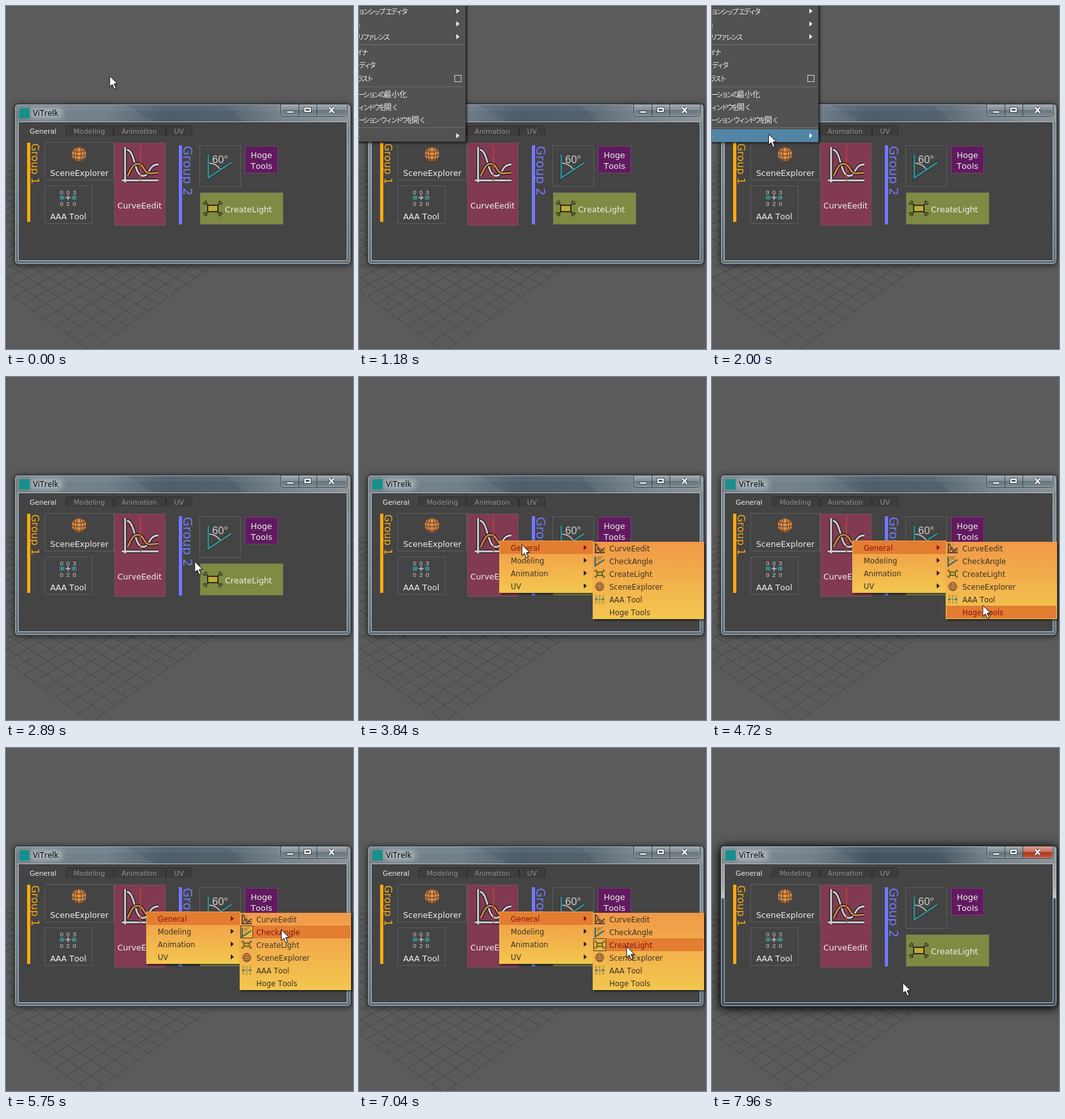
These frames come from a looping animation (542x537 px, 7.99 s). An HTML page with a canvas:

```html
<!DOCTYPE html>
<html lang="ja">
<head>
<meta charset="utf-8">
<title>Tool shelf</title>
<style>
html, body { margin: 0; width: 100%; height: 100%; overflow: hidden; background: #5b5b5b; }
canvas { display: block; width: 542px; height: 537px; }
</style>
</head>
<body>
<canvas id="stage" width="542" height="537"></canvas>
<script>
const ctx = document.getElementById('stage').getContext('2d');
const LOOP = 7990;
const UI = '"DejaVu Sans", sans-serif';
const JP = '"Noto Sans CJK JP", "Noto Sans CJK", sans-serif';
ctx.fontKerning = 'none';

// Pointer path: time, x, y
const path = [
  [0, 162, 110], [40, 162, 110], [235, 22, 7], [280, -20, -30],
  [1550, -20, 24], [1590, 4, 30], [2000, 88, 201], [2120, 132, 203],
  [2250, 195, 210], [2350, 260, 232], [2600, 356, 300], [2720, 360, 318],
  [3090, 219, 256], [3400, 219, 256], [3570, 240, 262], [3720, 240, 262],
  [3840, 254, 263], [4110, 398, 261], [4260, 398, 261], [4720, 423, 358],
  [4870, 425, 359], [5050, 425, 359], [5750, 430, 285], [5830, 430, 278],
  [6010, 428, 264], [6220, 428, 264], [6470, 424, 278], [6830, 424, 278],
  [7040, 418, 311], [7230, 420, 348], [7530, 420, 348], [7780, 298, 368],
  [LOOP, 298, 368]
];

function pointer(t) {
  const i = Math.max(1, path.findIndex(k => k[0] >= t));
  const [t0, x0, y0] = path[i - 1], [t1, x1, y1] = path[i];
  const u = (t - t0) / (t1 - t0);
  return [x0 + (x1 - x0) * u, y0 + (y1 - y0) * u];
}

function rect(x, y, w, h, fill, edge) {
  ctx.fillStyle = fill;
  ctx.fillRect(x, y, w, h);
  if (edge) {
    ctx.strokeStyle = edge;
    ctx.lineWidth = 1;
    ctx.strokeRect(x + .5, y + .5, w - 1, h - 1);
  }
}

function round(x, y, w, h, r) {
  ctx.beginPath();
  ctx.roundRect(x, y, w, h, r);
}

function text(s, x, y, size, color, font = UI, align = 'left') {
  ctx.font = size + 'px ' + font;
  ctx.textAlign = align;
  ctx.fillStyle = color;
  ctx.fillText(s, x, y);
}

// Japanese UI text: compact kana beside full-width kanji
function jpText(s, x, y, color, fromRight) {
  const runs = s.match(/[一-龠]+|[^一-龠]+/g).map(run => {
    const kanji = /[一-龠]/.test(run);
    const size = kanji ? 12 : 10.8;
    ctx.font = size + 'px ' + JP;
    ctx.letterSpacing = kanji ? '0px' : '-2.7px';
    return { run, size, gap: ctx.letterSpacing, width: ctx.measureText(run).width };
  });
  if (fromRight) x -= runs.reduce((sum, r) => sum + r.width, 0);
  for (const { run, size, gap, width } of runs) {
    ctx.letterSpacing = gap;
    text(run, x, y, size, color, JP);
    x += width;
  }
  ctx.letterSpacing = '0px';
}

function poly(pts, color, width, close) {
  ctx.beginPath();
  pts.forEach(([x, y]) => ctx.lineTo(x, y));
  if (close) ctx.closePath();
  if (width) {
    ctx.strokeStyle = color;
    ctx.lineWidth = width;
    ctx.stroke();
  } else {
    ctx.fillStyle = color;
    ctx.fill();
  }
}

function ramp(x0, y0, x1, y1, ...stops) {
  const g = ctx.createLinearGradient(x0, y0, x1, y1);
  stops.forEach(([p, c]) => g.addColorStop(p, c));
  return g;
}

function arrow(x, y, color) {
  poly([[x, y - 4], [x + 5, y], [x, y + 4]], color);
}

// Ground plane seen in perspective
function ground() {
  rect(0, 0, 542, 537, '#5b5b5b');
  const project = (x, z) => {
    const d = (x + z) * Math.SQRT1_2, s = (x - z) * Math.SQRT1_2;
    const k = 834 / (44.8 - .884 * d);
    return [133 + s * k, 318 + .468 * d * k];
  };
  for (let i = -12; i <= 12; i++) {
    poly([project(i, -12), project(i, 12)], '#464646', 1);
    poly([project(-12, i), project(12, i)], '#464646', 1);
  }
}

function frame(active) {
  ctx.save();
  ctx.shadowColor = active ? 'rgba(0,0,0,.85)' : 'rgba(0,0,0,.6)';
  ctx.shadowBlur = active ? 18 : 10;
  ctx.shadowOffsetY = active ? 2 : 1;
  round(13, 153, 526, 252, 6);
  ctx.fillStyle = '#24292d';
  ctx.fill();
  ctx.restore();

  ctx.save();
  round(14, 154, 524, 250, 5);
  ctx.clip();
  rect(14, 154, 524, 250, active
    ? ramp(0, 154, 0, 404, [0, '#8d959b'], [.25, '#a1a8ad'], [.32, '#c3c9cc'], [.33, '#46525e'], [1, '#45515d'])
    : ramp(0, 154, 0, 404, [0, '#7d868c'], [.4, '#7f8b93'], [1, '#64717b']));
  rect(14, 154, 524, 27, ramp(14, 0, 538, 0,
    [0, active ? '#838d94' : '#788289'], [.27, active ? '#74818a' : '#71808a'],
    [.45, active ? '#495968' : '#53636f'], [.66, active ? '#4c5c69' : '#5a6974'],
    [.8, '#79848b'], [1, '#8e9599']));
  poly([[185, 154], [345, 154], [372, 181], [232, 181]], 'rgba(35,53,68,.12)');
  rect(14, 154, 524, 10, 'rgba(255,255,255,.05)');
  ctx.restore();
  round(14.5, 154.5, 523, 249, 5);
  ctx.strokeStyle = active ? '#b4bdc3' : '#a9b2b8';
  ctx.lineWidth = 1;
  ctx.stroke();

  // Title and icon
  ctx.save();
  ctx.filter = 'blur(5px)';
  rect(39, 161, 48, 14, 'rgba(220,228,232,.6)');
  ctx.restore();
  rect(21, 160, 16, 16, '#178f8d');
  text('ViTrelk', 42, 172, 12.6, '#080808', '"Noto Sans", sans-serif');

  // Window buttons
  ctx.save();
  ctx.beginPath();
  ctx.rect(429, 154, 105, 20);
  ctx.clip();
  round(429.5, 149, 103, 23.5, 4);
  ctx.fillStyle = ramp(0, 154, 0, 173, [0, '#a5adb2'], [.48, '#808b92'], [.5, '#687680'], [1, '#7c8991']);
  ctx.fill();
  if (active) {
    round(486, 149, 46, 23, [0, 0, 4, 0]);
    ctx.fillStyle = ramp(0, 154, 0, 173, [0, '#d99c8f'], [.48, '#c66d5b'], [.5, '#ad3421'], [1, '#c75a3a']);
    ctx.fill();
  }
  round(429.5, 149, 103, 23.5, 4);
  ctx.strokeStyle = '#343d43';
  ctx.stroke();
  round(430.5, 149, 101, 22.5, 3);
  ctx.strokeStyle = 'rgba(235,240,242,.45)';
  ctx.stroke();
  rect(457, 154, 1, 18, '#3e474d');
  rect(485, 154, 1, 18, '#3e474d');
  ctx.restore();
  rect(438, 164, 12, 4, '#fff', '#454d52');
  rect(465, 158, 12, 9, '#fff', '#454d52');
  rect(468, 161, 6, 3, '#6c777e', '#454d52');
  for (const [c, w] of [['#454d52', 4.5], ['#fff', 2.4]]) {
    poly([[505, 159], [512, 167]], c, w);
    poly([[512, 159], [505, 167]], c, w);
  }

  rect(19, 181, 514, 218, '#444444', '#b5c0c7');
  rect(20, 182, 512, 216, '#444444', '#33383b');
}

// Icons are drawn around their own centre
const icons = {
  curve(ink) {
    const bend = ([x, y, ...rest], c, w) => {
      ctx.beginPath();
      ctx.moveTo(x, y);
      for (let i = 0; i < rest.length; i += 6) ctx.bezierCurveTo(...rest.slice(i, i + 6));
      ctx.strokeStyle = c;
      ctx.lineWidth = w;
      ctx.stroke();
    };
    const fall = [-21, -23, -8, -21, -10, 18, 4, 18, 15, 18, 12, 0, 28, 0];
    const wave = [-20, 18, -15, 8, -12, -1, -5, -1, 6, -1, 5, 14, 14, 14, 20, 14, 22, 13, 28, 13];
    const dark = '#242022';
    for (const [c, w] of [[dark, 6], [ink, 3]]) {
      poly([[-24, -27], [-24, 28]], c, w);
      poly([[-29, 25], [28, 25]], c, w);
    }
    bend(fall, dark, 5.5);
    bend(fall, ink, 2.8);
    bend(wave, dark, 5.5);
    bend(wave, '#d88b45', 2.6);
    poly([[0, -29], [0, 27]], '#b5483a', 1.5);
  },
  angle(ink) {
    poly([[18, -5], [-18, 19], [-18, -17]], '#242a2b', 5);
    poly([[18, -5], [-18, 19], [-18, -17]], '#36898c', 3);
    ctx.beginPath();
    ctx.arc(-18, 19, 23, -1.5, -.65);
    ctx.strokeStyle = ink;
    ctx.lineWidth = 1.4;
    ctx.stroke();
    text('60°', -12, -4, 16.5, ink, '"Liberation Sans", sans-serif');
  },
  light() {
    rect(-9, -6, 18, 12, '#2e2e20');
    rect(-7, -4, 14, 8, '#bcab2f');
    for (const sx of [-1, 1]) for (const sy of [-1, 1]) {
      poly([[sx * 7, sy * 5], [sx * 11, sy * 8]], '#302f20', 1.6);
      poly([[sx * 9, sy * 10], [sx * 13, sy * 6], [sx * 15, sy * 8], [sx * 11, sy * 12]], '#8d8c3d');
      poly([[sx * 9, sy * 10], [sx * 13, sy * 6], [sx * 15, sy * 8], [sx * 11, sy * 12]], '#302f20', 1.2, true);
    }
  },
  sphere() {
    const line = '#5e422c';
    ctx.beginPath();
    ctx.arc(0, 0, 11.5, 0, 7);
    ctx.fillStyle = '#df9047';
    ctx.fill();
    ctx.strokeStyle = line;
    ctx.lineWidth = 1.1;
    ctx.stroke();
    for (const rx of [3.5, 8]) {
      ctx.beginPath();
      ctx.ellipse(0, 0, rx, 11.5, 0, 0, 7);
      ctx.stroke();
    }
    for (const [y, w] of [[-6, 9.5], [0, 11.5], [6, 9.5]]) {
      ctx.beginPath();
      ctx.ellipse(0, y, w, 2.5, 0, 0, Math.PI);
      ctx.stroke();
    }
  },
  digits(ink) {
    ['003', '020'].forEach((row, j) => [...row].forEach((d, i) =>
      text(d, i * 10 - 10, j * 18 - 5, 9.5, ink, '"Liberation Sans", sans-serif', 'center')));
    rect(-13, -3, 7, 6, '#3a8688');
    rect(6, -3, 7, 6, '#3a8688');
    poly([[-4, 0], [4, 0]], ink, 1.3);
    poly([[0, -4], [0, 4]], ink, 1.3);
  }
};

function icon(name, x, y, scale = 1, ink = '#d0d0d0') {
  ctx.save();
  ctx.translate(x, y);
  ctx.scale(scale, scale);
  icons[name](ink);
  ctx.restore();
}

function group(label, x, y, size, color) {
  rect(x, y, 5, 124, color);
  ctx.save();
  ctx.translate(x + 7, y + 1);
  ctx.rotate(Math.PI / 2);
  text(label, 0, 0, size, color);
  ctx.restore();
}

function shelf() {
  text('General', 37, 200, 10.6, '#eeeeee');
  for (const [s, x, w] of [['Modeling', 93, 75], ['Animation', 168, 82], ['UV', 250, 41]]) {
    round(x + .5, 187.5, w - 1, 17, [3, 3, 0, 0]);
    ctx.fillStyle = '#3d3d3d';
    ctx.fill();
    ctx.strokeStyle = '#2d2d2d';
    ctx.lineWidth = 1;
    ctx.stroke();
    text(s, x + 12.5, 200, 10.8, '#929292');
  }
  rect(93, 203, 198, 2, '#444444');
  group('Group 1', 33, 214, 15.9, '#ffaa0f');
  group('Group 2', 270, 218, 19.4, '#7379ff');

  const edge = '#5d5d5d', ink = '#eeeeee';
  rect(60, 213, 109, 60, '#444444', edge);
  rect(60, 281, 75, 60, '#444444', edge);
  rect(169, 214, 80, 130, '#823a53', '#73505d');
  rect(302, 218, 65, 65, '#444444', edge);
  rect(373, 219, 52, 43, '#611a60', '#70456f');
  rect(303, 292, 130, 50, '#7f8a42', '#737954');
  icon('sphere', 114, 232);
  icon('digits', 97, 300);
  icon('curve', 210, 248);
  icon('angle', 334, 250);
  icon('light', 323, 317);
  text('SceneExplorer', 69, 266, 12.6, ink);
  text('AAA Tool', 69, 334, 12.6, ink);
  text('CurveEedit', 174, 317, 12.6, ink);
  text('Hoge', 399, 238, 12.8, ink, UI, 'center');
  text('Tools', 399, 255, 12.8, ink, UI, 'center');
  text('CreateLight', 342, 323, 12.6, ink);
}

function panel(x, y, w, h, fill, edge) {
  ctx.save();
  ctx.shadowColor = 'rgba(0,0,0,.6)';
  ctx.shadowBlur = 3;
  ctx.shadowOffsetX = ctx.shadowOffsetY = 2;
  rect(x, y, w, h, fill);
  ctx.restore();
  if (edge) rect(x, y, w, h, fill, edge);
}

// Label, right end, row centre, has submenu
const appRows = [
  ['ョンシップ\u2002エディタ', 74, 8, 1], ['集', 2, 28, 1], ['リファレンス', 46, 48, 1],
  ['イナ', 12, 72], ['ディタ', 24, 92], ['ラスト', 20, 113],
  ['ーションの最小化', 75, 138], ['ィンドウを開く', 59, 158],
  ['ーション\u2002ウィンドウを開く', 102, 178], ['ト', 0, 203, 1]
];

function appMenu(t, x, y) {
  const ink = '#eeeeee', hot = '#5285a6';
  panel(-5, -5, 172, 218, '#525252', '#2b2b2b');
  for (const sy of [60, 126, 190]) rect(0, sy, 166, 1, '#6e6e6e');
  const live = t > 1570;
  const over = x > 166 ? 203 : y;
  for (const [s, end, cy, more] of appRows) {
    if (live && Math.abs(over - cy) <= 10) rect(0, cy - 10, 166, 20, hot);
    jpText(s, end, cy + 4.5, ink, true);
    if (more) arrow(152, cy, ink);
  }
  rect(149, 108, 11, 11, '#525252', '#cfcfcf');
  if (t < 2140) return;
  panel(164, 191, 191, 79, '#525252', '#2b2b2b');
  ['ViTrelk', 'ツール設定', 'レイアウト', 'スクリプト'].forEach((s, i) => {
    const cy = 202 + i * 19;
    if (x > 165 && Math.abs(y - cy) < 9.5) rect(165, cy - 9, 189, 19, hot);
    if (i) jpText(s, 188, cy + 4.5, ink);
    else text(s, 188, cy + 4.5, 12, ink, '"Noto Sans", sans-serif');
  });
}

const tools = [['CurveEedit', 'curve', .28], ['CheckAngle', 'angle', .4], ['CreateLight', 'light', .54],
  ['SceneExplorer', 'sphere', .58], ['AAA Tool', 'digits', .55], ['Hoge Tools']];

function popup(t, x, y) {
  const ink = '#3c3426', hotInk = '#8c1010', hot = '#e27d31';
  const fill = (a, b) => ramp(0, a, 0, b, [0, '#f19948'], [1, '#f3c74f']);
  panel(219, 256, 147, 82, fill(256, 338));
  ['General', 'Modeling', 'Animation', 'UV'].forEach((s, i) => {
    const on = i === 0 && t > 3440;
    if (on) rect(220, 257, 145, 20, hot);
    text(s, 237, 272 + i * 20, 11.5, on ? hotInk : ink);
    arrow(351, 267 + i * 20, on ? hotInk : '#2c2419');
  });
  if (t < 3550) return;
  panel(365, 258, 174, 121, fill(258, 379));
  const row = x > 366 ? Math.floor((y - 258) / 20) : -1;
  tools.forEach(([s, name, scale], i) => {
    const cy = 268 + i * 20, on = i === row;
    if (on) {
      rect(366, cy - 10, 172, 20, hot);
      if (name) rect(366, cy - 10, 20, 20, '#f0b444', '#4c3b22');
    }
    if (name) icon(name, 376, cy, scale, '#6b5b3b');
    text(s, 391, cy + 5, 11.5, on ? hotInk : ink);
  });
}

function cursor(x, y) {
  ctx.save();
  ctx.translate(x, y - .5);
  ctx.shadowColor = 'rgba(0,0,0,.4)';
  ctx.shadowBlur = 2;
  ctx.shadowOffsetX = ctx.shadowOffsetY = 1;
  const shape = [[0, 0], [0, 17], [4, 13.3], [7, 20.5], [9.8, 19.3], [6.8, 12.4], [12, 12]];
  poly(shape, '#fff');
  ctx.shadowColor = 'transparent';
  poly(shape, '#111', 1, true);
  ctx.restore();
}

function draw(now) {
  const t = now % LOOP;
  const [x, y] = pointer(t);
  ground();
  frame(false);
  const glow = Math.min(1, Math.max(0, (t - 7790) / 110));
  if (glow > 0) {
    ctx.globalAlpha = glow;
    frame(true);
    ctx.globalAlpha = 1;
  }
  shelf();
  if (t >= 1180 && t < 2380) appMenu(t, x, y);
  if (t >= 3400 && t < 7790) popup(t, x, y);
  if (t < 280 || t > 1570) cursor(x, y);
}

const start = performance.now();
function tick() {
  draw(performance.now() - start);
  requestAnimationFrame(tick);
}
tick();
</script>
</body>
</html>
```
